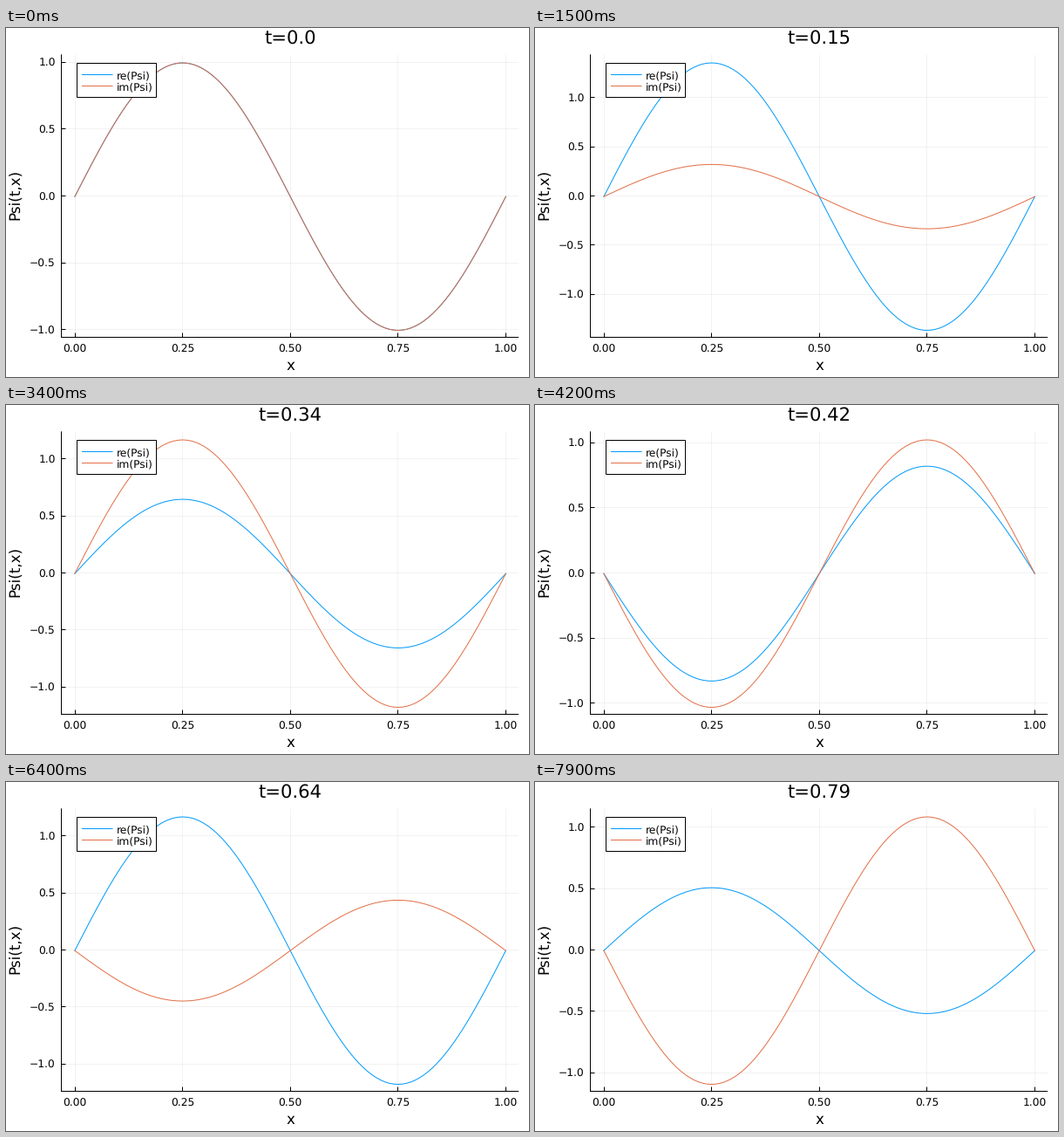
Animation, 600 px wide and 400 px high, one loop 8000 ms. Source, as a matplotlib script:

```python
import numpy as np
import matplotlib.pyplot as plt
from matplotlib.animation import FuncAnimation
from matplotlib.patches import Rectangle

W, H, FRAMES, DT = 600, 400, 80, 0.01
PX = 0.72  # points per pixel at 100 dpi
BLUE, ORANGE = "#009afa", "#e36f47"
TOP, BOTTOM, RIGHT = 30.8, 355.7, 588.2
MID = (TOP + BOTTOM) / 2
TICK, LABEL, TITLE = 12.2, 16.8, 21.2  # text sizes in pixels

plt.rcParams["font.family"] = "DejaVu Sans"
plt.rcParams["text.hinting"] = "none"

# Complex amplitude of the standing wave at a few times
KEYS = np.array([0, 0.15, 0.26, 0.42, 0.46, 0.51, 0.64, 0.79])
AMPS = np.array([1 + 1j, 1.360 + 0.327j, -0.468 - 1.285j, -0.8244 - 1.0262j,
                 0.942 - 0.9034j, 0.580 + 1.157j, 1.172 - 0.442j, 0.512 - 1.088j])
OMEGA = 37.3
# Slow drift of log-modulus and phase in the rotating frame
DRIFT = np.log(AMPS * np.exp(-1j * OMEGA * KEYS))
SLOPE = np.gradient(DRIFT, KEYS, edge_order=2)


def amplitude(t):
    i = min(np.searchsorted(KEYS, t, side="right") - 1, len(KEYS) - 2)
    h = KEYS[i + 1] - KEYS[i]
    u = (t - KEYS[i]) / h
    log_amp = ((1 + 2 * u) * (1 - u) ** 2 * DRIFT[i] + u * (1 - u) ** 2 * h * SLOPE[i]
               + u * u * (3 - 2 * u) * DRIFT[i + 1] + u * u * (u - 1) * h * SLOPE[i + 1])
    return np.exp(log_amp + 1j * OMEGA * t)


fig = plt.figure(figsize=(W / 100, H / 100), dpi=100, facecolor="white")
ax = fig.add_axes([0, 0, 1, 1])
ax.set_xlim(0, W)
ax.set_ylim(H, 0)
ax.axis("off")

X = np.linspace(0, 1, 101)
WAVE = np.sin(2 * np.pi * X)


# Straight lines sit on whole pixels
def col(x):
    return np.floor(x + 0.1) + 0.5


def row(y):
    return np.floor(y - 0.75) + 0.5


def line(x, y, color="black", width=1.0, **kw):
    ax.plot(x, y, color=color, lw=width * PX, snap=False, **kw)


def rule(x, y, color="black", **kw):
    line(x, y, color, solid_capstyle="butt", **kw)


def text(x, y, s, size, ha="center", **kw):
    ax.text(x, y, s, fontsize=size * PX, ha=ha, va="baseline", **kw)


def draw_axes(left, to_x, to_y, limit, step):
    spine, base = col(left - 0.5), row(BOTTOM)
    n = int(limit / step)
    digits = 2 if step < 0.5 else 1

    for v in np.arange(5) / 4:
        x = col(to_x(v))
        rule([x, x], [TOP, base], alpha=0.05, zorder=1)
        rule([x, x], [base, base - 5], zorder=2)
        text(to_x(v), 371.5, f"{v:.2f}", TICK)
    for v in step * np.arange(-n, n + 1):
        y = row(to_y(v))
        rule([spine, RIGHT], [y, y], alpha=0.05, zorder=1)
        rule([spine, spine + 5], [y, y], zorder=2)
        label = f"{v:.{digits}f}".replace("-", "\u2212")
        text(left - 7.4, to_y(v) + 4.2, label, TICK, ha="right")

    rule([spine - 0.5, RIGHT], [base, base], zorder=2)
    rule([spine, spine], [TOP - 0.5, base], zorder=2)


def draw_legend(left):
    x = col(left + 17.3)
    ax.add_patch(Rectangle((x, 40.5), 91, 39, fc="white", ec="black", lw=PX,
                           snap=False, zorder=5))
    for y, color, name in ((53.5, BLUE, "re(Psi)"), (66.5, ORANGE, "im(Psi)")):
        rule([x + 5.5, x + 41], [y, y], color, zorder=6)
        text(x + 45, y + 4.6, name, TICK, ha="left", zorder=6)


def draw(i):
    for artist in [*ax.lines, *ax.texts, *ax.patches]:
        artist.remove()

    t = round(i * DT, 2)
    amp = amplitude(t)
    limit = 1.06 * max(abs(amp.real), abs(amp.imag))
    # Finer ticks need wider labels, which push the axis to the right
    wide = limit < 1
    left = 64.1 + (7.8 if wide else 0)
    span = (RIGHT - left) / 1.06

    def to_x(v):
        return left + span * (v + 0.03)

    def to_y(v):
        return MID - v / limit * (BOTTOM - TOP) / 2

    draw_axes(left, to_x, to_y, limit, 0.25 if wide else 0.5)
    line(to_x(X), to_y(amp.real * WAVE), BLUE, zorder=3)
    line(to_x(X), to_y(amp.imag * WAVE), ORANGE, zorder=4)
    draw_legend(left)

    center = (left + RIGHT) / 2
    text(center, 17.8, f"t={t}", TITLE)
    text(center, 391.5, "x", LABEL)
    text(15.8, MID - 2.2, "Psi(t,x)", LABEL, rotation=90, rotation_mode="anchor")
    return []


anim = FuncAnimation(fig, draw, frames=FRAMES, init_func=lambda: [],
                     interval=100, repeat=True, repeat_delay=0)
plt.show()
```
